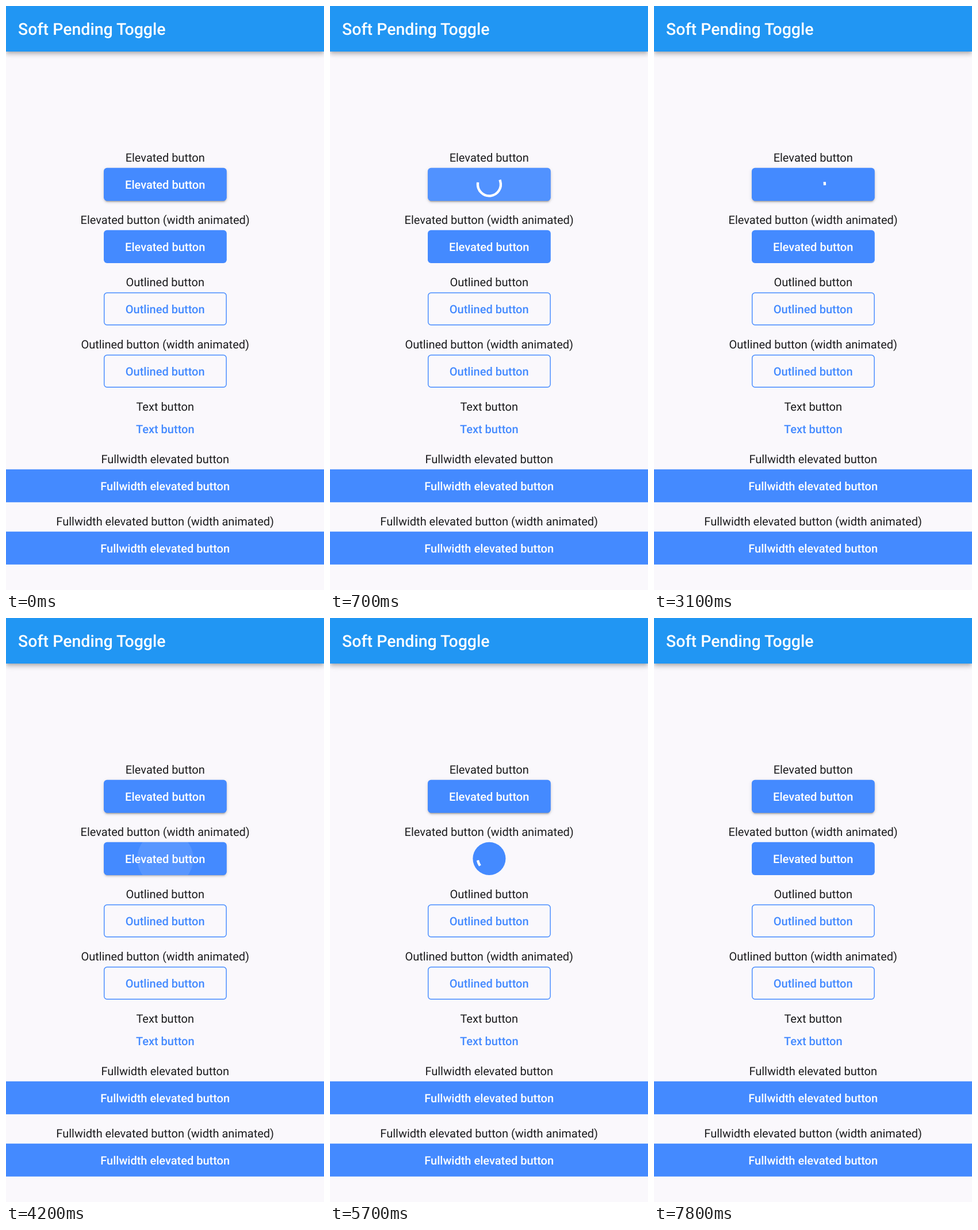
Write an HTML page that moves like this. It is 553x1013 px and loops after 8000 ms.

```html
<!DOCTYPE html>
<html lang="en">
<head>
<meta charset="utf-8">
<title>Loading buttons</title>
<style>
  html, body { margin: 0; width: 100%; height: 100%; overflow: hidden; background: #faf8fc; }
  .stage { position: relative; width: 553px; height: 1013px; overflow: hidden; }
  .bar, .shadow, svg { position: absolute; }
  .bar {
    left: 0; top: 0; width: 553px; height: 79px; background: #2196f3;
    box-shadow: 0 2.8px 5.6px -1.4px rgba(0,0,0,.2), 0 5.6px 7px rgba(0,0,0,.14), 0 1.4px 14px rgba(0,0,0,.12);
  }
  .shadow {
    left: 171px; top: 282px; width: 212px; height: 55px; border-radius: 5px;
    box-shadow: 0 4.2px 1.4px -2px rgba(0,0,0,.2), 0 2.8px 3.4px .6px rgba(0,0,0,.14), 0 1.4px 7px .6px rgba(0,0,0,.12);
  }
  svg { left: 0; top: 0; }
  .btn { x: 170px; width: 213.8px; height: 57.1px; rx: 5.7px; fill: #448aff; }
  .full { x: 0; width: 553px; rx: 0; }
  .outlined { x: 170.7px; width: 212.4px; height: 55.7px; rx: 5px; fill: none; stroke: #448aff; stroke-width: 1.43; }
  .ink { fill: #fff; }
  text {
    font: 400 20px Roboto, sans-serif; text-anchor: middle; fill: #1b1b1d;
    text-rendering: geometricPrecision;
  }
  .title { font-size: 28.5px; font-weight: 500; text-anchor: start; fill: #fff; }
  .on { font-weight: 500; fill: #fff; }
  .flat { font-weight: 500; fill: #448aff; }
  .spin { fill: none; stroke: #fff; stroke-width: 4.29; stroke-linecap: square; }
</style>
</head>
<body>
<div class="stage">
  <div class="bar"></div>
  <div class="shadow"></div>
  <div class="shadow" id="shadowB"></div>
  <svg width="553" height="1013">
    <clipPath id="clipA"><use href="#btnA"/></clipPath>
    <clipPath id="clipB"><use href="#btnB"/></clipPath>
    <rect class="btn" id="btnA" y="280.8"/>
    <rect class="btn" id="btnB" y="388.8"/>
    <rect class="btn outlined" y="497.5"/>
    <rect class="btn outlined" y="605.5"/>
    <rect class="btn full" y="803.7"/>
    <rect class="btn full" y="911.7"/>
    <g clip-path="url(#clipA)"><circle class="ink" id="inkA" cx="276.9" cy="309.4"/></g>
    <g clip-path="url(#clipB)"><circle class="ink" id="inkB" cx="276.9" cy="417.4"/></g>

    <text class="title" x="21" y="50">Soft Pending Toggle</text>
    <text x="276.7" y="269.7">Elevated button</text>
    <text class="on" id="textA" x="276.7" y="316.6">Elevated button</text>
    <text x="276.7" y="377.7">Elevated button (width animated)</text>
    <text class="on" id="textB" x="276.7" y="424.6">Elevated button</text>
    <text x="276.7" y="485.7">Outlined button</text>
    <text class="flat" x="276.7" y="532.6">Outlined button</text>
    <text x="276.7" y="593.7">Outlined button (width animated)</text>
    <text class="flat" x="276.7" y="640.6">Outlined button</text>
    <text x="276.7" y="701.7">Text button</text>
    <text class="flat" x="276.7" y="740.6">Text button</text>
    <text x="276.7" y="792.7">Fullwidth elevated button</text>
    <text class="on" x="276.7" y="839.6">Fullwidth elevated button</text>
    <text x="276.7" y="900.7">Fullwidth elevated button (width animated)</text>
    <text class="on" x="276.7" y="947.6">Fullwidth elevated button</text>
    <path class="spin" id="spinA"/>
    <path class="spin" id="spinB"/>
  </svg>
</div>
<script>
const LOOP = 8000, CX = 276.9, R = 20;
const FULL = 213.8, SMALL = 57.1, CORNER = 5.7, RESIZE = 285, ROUND = 200;
const $ = id => document.getElementById(id);
const clamp = v => Math.min(1, Math.max(0, v));
const mix = (a, b, k) => a + (b - a) * k;
const ramp = (t, from, length) => clamp((t - from) / length);

// cubic-bezier(.4, 0, .2, 1)
function ease(x) {
  if (x <= 0 || x >= 1) return clamp(x);
  let lo = 0, hi = 1, u;
  for (let i = 0; i < 24; i++) {
    u = (lo + hi) / 2;
    const bx = 1.2 * u * (1 - u) ** 2 + 0.6 * u * u * (1 - u) + u ** 3;
    if (bx < x) lo = u; else hi = u;
  }
  return 3 * u * u * (1 - u) + u ** 3;
}

// Indeterminate ring: the head runs ahead, then the tail catches up
function arc(ms, cy) {
  const phase = (ms % 1333) / 1333;
  const head = ease(phase * 2), tail = ease(phase * 2 - 1);
  const start = -90 + tail * 270 + ms / 2222 * 360 + phase * 90;
  const sweep = Math.max((head - tail) * 270, 0.06);
  const point = deg => {
    const a = deg * Math.PI / 180;
    return `${(CX + R * Math.cos(a)).toFixed(3)} ${(cy + R * Math.sin(a)).toFixed(3)}`;
  };
  return `M${point(start)}A${R} ${R} 0 ${sweep > 180 ? 1 : 0} 1 ${point(start + sweep)}`;
}

const glow = (t, start) => 0.14 * ramp(t, start - 120, 120) * (1 - ramp(t, start + 100, 450));

function makeButton(key, cy, start, end, rate) {
  const ink = $('ink' + key), label = $('text' + key), ring = $('spin' + key);
  return t => {
    const busy = t >= start && t < end;
    label.style.display = busy ? 'none' : '';
    ring.style.display = busy ? '' : 'none';
    if (busy) ring.setAttribute('d', arc((t - start) * rate, cy));
    ink.style.opacity = glow(t, start);
    ink.setAttribute('r', mix(25, 115, ramp(t, start - 120, 345)));
  };
}

const B_START = 4230, B_END = 7590;
const drawA = makeButton('A', 309.4, 383, 3385, 1);
const drawB = makeButton('B', 417.4, B_START, B_END, 0.973);
const boxB = $('btnB').style, shadowB = $('shadowB').style;
shadowB.top = '390px';

function drawShrink(t) {
  const narrow = ramp(t, B_START, RESIZE) - ramp(t, B_END - RESIZE, RESIZE);
  const round = ease(ramp(t, B_START + RESIZE, ROUND)) - ease(ramp(t, B_END, ROUND));
  const width = mix(FULL, SMALL, narrow), left = CX - width / 2;
  const radius = mix(CORNER, SMALL / 2, round);
  boxB.width = width + 'px';
  boxB.x = left + 'px';
  boxB.rx = radius + 'px';
  shadowB.width = width - 2 + 'px';
  shadowB.left = left + 1 + 'px';
  shadowB.borderRadius = radius - 1 + 'px';
  shadowB.opacity = glow(t, B_START) * 7;
}

const origin = performance.now();
function frame() {
  const t = (performance.now() - origin) % LOOP;
  drawA(t);
  drawB(t);
  drawShrink(t);
  requestAnimationFrame(frame);
}
frame();
</script>
</body>
</html>
```
